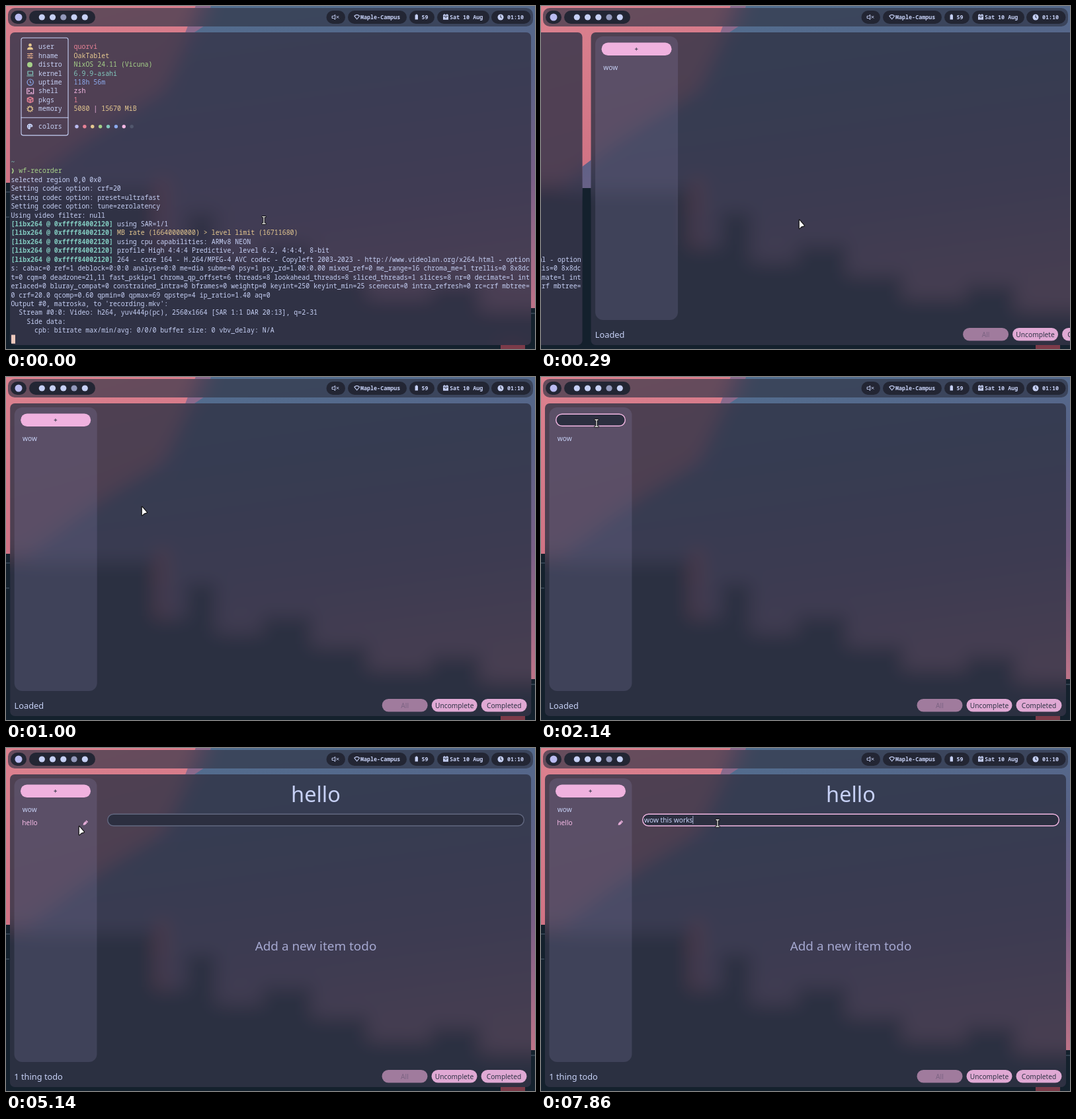
Write an HTML page that moves like this. It is 800 px wide and 520 px high and loops after 8000 ms.

```html
<!DOCTYPE html>
<html lang="en">
<head>
<meta charset="utf-8">
<title>Desktop todo demo</title>
<style>
  html, body { margin: 0; width: 100%; height: 100%; overflow: hidden; background: #14212c; }
  svg { display: block; width: 800px; height: 520px; }
  text { white-space: pre; }
  .mono { font: 9.917px "Noto Sans Mono", monospace; fill: #c6d0f5; }
  .bar { font: 600 8.4px "Noto Sans Mono", monospace; fill: #c6d0f5; }
  .ui { font: 10.2px "Noto Sans", sans-serif; fill: #c6d0f5; }
  .mid { text-anchor: middle; }
  .dark { fill: #303446; }
  .line { fill: none; stroke: #c6d0f5; stroke-linecap: round; stroke-linejoin: round; }
  .field { fill: #2c2f40; stroke: #f4b8e4; stroke-width: 1.4; }
</style>
</head>
<body>
<svg viewBox="0 0 800 520">
  <defs>
    <linearGradient id="sky" x1=".35" y1="0" x2=".55" y2="1">
      <stop offset="0" stop-color="#4f7392"/>
      <stop offset=".35" stop-color="#586287"/>
      <stop offset=".6" stop-color="#7a5f86"/>
      <stop offset=".9" stop-color="#c07488"/>
    </linearGradient>
    <linearGradient id="glow" x1="0" y1="0" x2=".3" y2="1">
      <stop offset="0" stop-color="#df8692"/>
      <stop offset="1" stop-color="#cf7183"/>
    </linearGradient>
    <filter id="blur" x="-10%" y="-10%" width="120%" height="120%"><feGaussianBlur stdDeviation="13"/></filter>
    <clipPath id="panes">
      <rect x="3" y="3" width="794" height="28" rx="10"/>
      <rect class="pane" y="40" width="788" height="474" rx="7"/>
      <rect class="pane" y="40" width="788" height="474" rx="7"/>
    </clipPath>
    <g id="wall">
      <rect x="-60" y="-60" width="920" height="640" fill="url(#sky)"/>
      <path d="M230 -60H330L300 30L282 42L238 128L200 150Z" fill="#8a6a8c"/>
      <path d="M-60 -60H310L272 38L236 125L120 200L30 268L-60 290Z" fill="url(#glow)"/>
      <path d="M-60 268H32V276H228V362H270V310H320V385H385V360H465V405H550V440H640V420H720V458H860V580H-60Z" fill="#14212d"/>
      <path d="M228 260H245V326H228ZM228 334H245V362H228Z" fill="#b85868"/>
      <path d="M748 513H785V520H748Z" fill="#7c3b49"/>
      <path d="M0 282H6M0 320H5M16 300H28M16 338H28M231 388H240M794 466H800" stroke="#31404f" stroke-width="2"/>
    </g>
  </defs>

  <use href="#wall"/>
  <g clip-path="url(#panes)"><use href="#wall" filter="url(#blur)"/></g>

  <g id="topbar">
    <rect x="3" y="3" width="794" height="28" rx="10" fill="#303446" opacity=".68"/>
    <g id="pills" fill="#232634"></g>
    <circle cx="19" cy="17" r="5.5" fill="#babbf1"/>
    <g id="spaces"></g>
    <path d="M493.5 15.3h1.8l2.4-2v7.2l-2.4-2h-1.8zM500 15.3l3 3m0-3l-3 3" class="line" stroke-width="1"/>
    <path d="M526.8 15.2Q530.7 11.6 534.6 15.2L530.7 20Z" class="line" stroke-width="1.1"/>
    <path d="M619.8 12.6h2v1h1.2v7h-4.4v-7h1.2z" fill="#c6d0f5"/>
    <path d="M661 13.3h1.4v-1.2h1.2v1.2h2.8v-1.2h1.2v1.2h1.4v7.5h-8z" fill="#c6d0f5"/>
    <path d="M661.8 15.6h6.4m-4.6 2h3" stroke="#232634" stroke-width=".9"/>
    <circle cx="748" cy="17" r="4.5" fill="#c6d0f5"/>
    <path d="M748 14v3.2l1.8 1" fill="none" stroke="#232634"/>
    <g class="bar">
      <text x="536" y="20">Maple-Campus</text><text x="628.4" y="20">59</text>
      <text x="671" y="20">Sat 10 Aug</text><text x="758" y="20">01:10</text>
    </g>
  </g>

  <g id="term">
    <rect x="6" y="40" width="788" height="474" rx="7" fill="#35364a" opacity=".83"/>
    <rect x="23" y="48.3" width="71" height="147.8" rx="3" class="line" stroke-width="1.1"/>
    <path d="M23 169.3H94" class="line" stroke-width="1.1"/>
    <g id="icons" fill="none" stroke-width="1.2" stroke-linejoin="round">
      <path d="M32 66.3q0-4 4.5-4t4.5 4z" fill="#e5c890"/><circle cx="36.5" cy="59.2" r="2.4" fill="#e5c890"/>
      <path d="M32 72.5h9m-9 3h9m-9 3h9M38 71v3m-3 0v3m3 0v3" stroke="#e5b08a"/>
      <circle cx="36" cy="89" r="4" fill="#a6d189"/>
      <path d="M33 99h7.5v5H33zM31.4 106h10.4" stroke="#81c8be"/>
      <circle cx="36.7" cy="115.6" r="4.6" stroke="#8caaee"/><path d="M36.7 113v3l2 1" stroke="#8caaee"/>
      <path d="M31.8 125h9.8v8h-9.8zM33.5 127.2l2 1.6l-2 1.6m3.5 1h2.6" stroke="#f4b8e4"/>
      <path d="M36.6 138l4.3 1.9v4.8l-4.3 2l-4.3-2v-4.8zM32.3 140l4.3 2l4.3-2m-4.3 2v4.6" stroke="#e78296" fill="#e7829666"/>
      <circle cx="36.4" cy="156" r="3.2" stroke="#e5c890"/><circle cx="36.4" cy="156" r="4.4" stroke="#e5c890" stroke-dasharray="1.3 1.4"/>
      <path d="M36 178.5a4.2 4.2 0 1 0 0 8.4q1.4-.6.6-2.2q0-1.4 2-1.2q2 0 1.8-1.5q-.5-3.5-4.4-3.5z" fill="#c6d0f5"/>
      <path d="M34 181.6h1m2 0h1m-4.5 2.4h1" stroke="#303446"/>
      <path d="M9.2 246.3q3.2 3.6 0 7.4" stroke="#a6d189" stroke-width="1.6"/>
    </g>
    <g id="log" class="mono"></g>
    <rect x="8" y="498.5" width="6" height="13.3" fill="#edc8bc"/>
  </g>

  <g id="app" class="ui">
    <rect x="6" y="40" width="788" height="474" rx="7" fill="#303446" opacity=".82"/>
    <rect x="12.5" y="46" width="125" height="430" rx="12" fill="#8f8bb8" opacity=".2"/>
    <g id="add"><rect x="22" y="55.5" width="106" height="19.5" rx="9.75" fill="#f0b2df"/><path d="M72.4 65.3h4.6m-2.3-2.3v4.6" stroke="#303446" stroke-width=".9"/></g>
    <g id="newList">
      <rect x="22.7" y="56.2" width="104.6" height="18.1" rx="9.05" class="field"/>
      <text x="25" y="69"></text><path class="caret line" stroke-width=".8"/>
    </g>
    <text x="24.8" y="97.3">wow</text>
    <text id="hello" x="24.3" y="116.8">hello</text>
    <text id="status" x="12.3" y="502.6" font-size="12.8" style="font-size:12.8px"></text>
    <g id="filters"></g>
    <g id="detail">
      <path d="M116.5 117l.7-2.9l4.4-4.6l2.5 2.4l-4.4 4.5z" fill="#e5add8"/><path d="M120.2 110.8l2.4 2.4" stroke="#4a465c" stroke-width=".7"/>
      <text x="468.5" y="82" class="mid" style="font-size:32.5px">hello</text>
      <rect id="itemBox" x="153.7" y="100.2" width="629.6" height="17.8" rx="8.9" class="field"/>
      <g id="newItem"><text x="156" y="112.6"></text><path class="caret line" stroke-width=".8"/></g>
      <text x="468.5" y="307" class="mid" style="font-size:18.9px;fill:#a5a8d0">Add a new item todo</text>
    </g>
  </g>

  <g id="cursor" stroke-linejoin="round" stroke-linecap="round">
    <path id="arrow" d="M.2 .8V13.4Q.4 14.6 1.5 13.8L4 11.3L8 10.2Q9 9.6 8.2 8.7L1.2 .6Q.4 0 .2 .8Z" fill="#fff" stroke="#111" stroke-width="1.2"/>
    <g id="beam" fill="none">
      <path d="M-2.2 -5.2H2.2M-2.2 5.2H2.2M0 -5V5" stroke="#111" stroke-width="3.2"/>
      <path d="M-2.2 -5.2H2.2M-2.2 5.2H2.2M0 -5V5" stroke="#fff" stroke-width="1.2"/>
    </g>
    <path id="hand" d="M-1.4 8V1.6Q-1.2 .4 0 .5Q1.2 .6 1.2 1.6V5L5 6Q6 6.4 5.8 7.6L5 11.4Q4.4 14 1.6 14Q-1 14 -2.4 11.6L-4.6 8.4Q-4.8 7 -3.4 7Z" fill="#fff" stroke="#111" stroke-width="1.2"/>
  </g>
</svg>
<script>
const NS = 'http://www.w3.org/2000/svg';
const $ = s => document.querySelector(s);
const add = (parent, tag, attrs, text) => {
  const el = parent.appendChild(document.createElementNS(NS, tag));
  for (const a in attrs) el.setAttribute(a, attrs[a]);
  if (text) el.textContent = text;
  return el;
};
const show = (sel, on) => $(sel).setAttribute('visibility', on ? 'visible' : 'hidden');

const CELL = 5.95, ROW = 13.44;
const red = '#e78296', yellow = '#e5c890', green = '#a6d189', teal = '#81c8be',
      blue = '#8caaee', pink = '#f4b8e4';

// Top bar
[[7, 24], [35, 100], [484.5, 28.5], [517, 89], [610, 38], [652, 79], [734, 59.5]]
  .forEach(([x, width]) => add($('#pills'), 'rect', { x, y: 7, width, height: 20, rx: 10 }));
const spaces = [0, 1, 2, 3, 4].map(i => add($('#spaces'), 'circle', { cx: 54.3 + 16.25 * i, cy: 17, r: 4.6 }));

// Terminal
const print = (row, col, text, fill = '#c6d0f5', weight = 400) =>
  add($('#log'), 'text', { x: 7.4 + CELL * col, y: 65.2 + ROW * row, style: `fill:${fill};font-weight:${weight}` }, text);

[['user', 'quorvi', red], ['hname', 'OakTablet', yellow], ['distro', 'NixOS 24.11 (Vicuna)', green],
 ['kernel', '6.9.9-asahi', teal], ['uptime', '118h 56m', blue], ['shell', 'zsh', pink],
 ['pkgs', '1', red], ['memory', '5080   15670 MiB', yellow]].forEach(([label, value, fill], i) => {
  print(i, 7, label);
  print(i, 16, value, fill);
});
print(7, 21, '|', pink);
print(9, 7, 'colors');
['#babbf1', red, yellow, green, teal, blue, pink, '#51576d'].forEach((fill, i) =>
  add($('#log'), 'circle', { cx: 107 + 11.88 * i, cy: 182.7, r: 2.7, fill }));

print(13, 0, '~', teal);
print(14, 2, 'wf-recorder', green);
['selected region 0,0 0x0', 'Setting codec option: crf=20', 'Setting codec option: preset=ultrafast',
 'Setting codec option: tune=zerolatency', 'Using video filter: null'].forEach((s, i) => print(15 + i, 0, s));
['using SAR=1/1', 'MB rate (16640000000) > level limit (16711680)', 'using cpu capabilities: ARMv8 NEON',
 'profile High 4:4:4 Predictive, level 6.2, 4:4:4, 8-bit',
 '264 - core 164 - H.264/MPEG-4 AVC codec - Copyleft 2003-2023 - http://www.videolan.org/x264.html - option'
].forEach((s, i) => {
  print(20 + i, 0, '[libx264 @ 0xffff84002120]', teal, 600);
  print(20 + i, 27, s, i === 1 ? yellow : undefined);
});
['s: cabac=0 ref=1 deblock=0:0:0 analyse=0:0 me=dia subme=0 psy=1 psy_rd=1.00:0.00 mixed_ref=0 me_range=16 chroma_me=1 trellis=0 8x8dc',
 't=0 cqm=0 deadzone=21,11 fast_pskip=1 chroma_qp_offset=6 threads=8 lookahead_threads=8 sliced_threads=1 slices=8 nr=0 decimate=1 int',
 'erlaced=0 bluray_compat=0 constrained_intra=0 bframes=0 weightp=0 keyint=250 keyint_min=25 scenecut=0 intra_refresh=0 rc=crf mbtree=',
 '0 crf=20.0 qcomp=0.60 qpmin=0 qpmax=69 qpstep=4 ip_ratio=1.40 aq=0',
 "Output #0, matroska, to 'recording.mkv':"].forEach((s, i) => print(25 + i, 0, s));
print(30, 2, 'Stream #0:0: Video: h264, yuv444p(pc), 2560x1664 [SAR 1:1 DAR 20:13], q=2-31');
print(31, 4, 'Side data:');
print(32, 6, 'cpb: bitrate max/min/avg: 0/0/0 buffer size: 0 vbv_delay: N/A');

// Filter buttons
['All', 'Uncomplete', 'Completed'].forEach((label, i) => {
  const x = 568.5 + 75 * i;
  add($('#filters'), 'rect', { x, y: 488, width: 69, height: 19.5, rx: 9.75, fill: i ? '#e0a9d4' : '#a07b9d' });
  add($('#filters'), 'text', { x: x + 34.5, y: 501.5, class: 'mid', style: `fill:${i ? '#303446' : '#7c6483'}` }, label);
});

// Timelines: [ms, value...]
const moves = [
  [0, 390, 324.7, 'beam'], [140, 390, 323.6, 'arrow'], [710, 362, 303, 'arrow'], [860, 290, 252, 'arrow'],
  [1000, 205, 196, 'arrow'], [1140, 143, 154, 'arrow'], [1290, 110, 110, 'arrow'], [1430, 90, 82, 'arrow'],
  [1570, 84, 74, 'hand'], [2140, 84, 70, 'beam'], [3710, 85, 69.5, 'hand'], [4140, 70, 76.2, 'hand'],
  [4290, 58, 90, 'hand'], [4430, 46, 105, 'hand'], [4570, 39, 114, 'hand'], [4710, 36, 117, 'hand'],
  [5140, 110, 118, 'arrow'], [5290, 225, 114, 'beam'], [5430, 267, 114, 'beam']];
const listText = [[0, ''], [2570, 'h'], [2860, 'he'], [3140, 'hell'], [3290, 'hello']];
const itemText = [[0, ''], [5860, 'w'], [6000, 'wo'], [6140, 'wow'], [6570, 'wow '], [6710, 'wow th'],
  [6860, 'wow thi'], [7140, 'wow this'], [7290, 'wow this '], [7430, 'wow this w'], [7570, 'wow this wo'],
  [7710, 'wow this work'], [7860, 'wow this works']];
const at = (list, t) => list.filter(e => e[0] <= t).pop();

function type(sel, value, top) {
  const text = $(sel + ' text');
  text.textContent = value;
  const x = +text.getAttribute('x') + (value ? text.getComputedTextLength() : 0) + .4;
  $(sel + ' .caret').setAttribute('d', value ? `M${x} ${top}v11.5` : '');
}

function draw(t) {
  const slide = t ? 801 * Math.exp(-.0082 * (t + 8)) : 801;
  const shift = [slide - 801, slide];
  ['#term', '#app'].forEach((s, i) => $(s).setAttribute('transform', `translate(${shift[i]})`));
  document.querySelectorAll('.pane').forEach((p, i) => p.setAttribute('x', 6 + shift[i]));

  const active = t < 140 ? 2 : t < 290 ? -1 : 3;
  spaces.forEach((s, i) => s.setAttribute('fill', i === active ? '#9298bb' : '#c6d0f5'));

  const editing = t >= 2000 && t < 3710, open = t >= 5000;
  show('#add', !editing);
  show('#newList', editing);
  show('#hello', t >= 3710);
  show('#detail', open);
  $('#hello').style.fill = open ? pink : '';
  $('#itemBox').style.stroke = t >= 5570 ? pink : '#626880';
  $('#status').textContent = t < 3710 ? 'Loaded' : '1 thing todo';
  type('#newList', at(listText, t)[1], 59.5);
  type('#newItem', at(itemText, t)[1], 103.3);

  const [, x, y, kind] = at(moves, t);
  $('#cursor').setAttribute('transform', `translate(${x} ${y})`);
  ['arrow', 'beam', 'hand'].forEach(k => show('#' + k, k === kind));
}

const start = performance.now();
let last = -1;
function tick() {
  const step = Math.floor(((performance.now() - start) % 8000 + 3) * 7 / 1000) % 56;
  if (step !== last) draw(Math.round(step * 100 / 7) * 10);
  last = step;
  requestAnimationFrame(tick);
}
tick();
</script>
</body>
</html>
```
